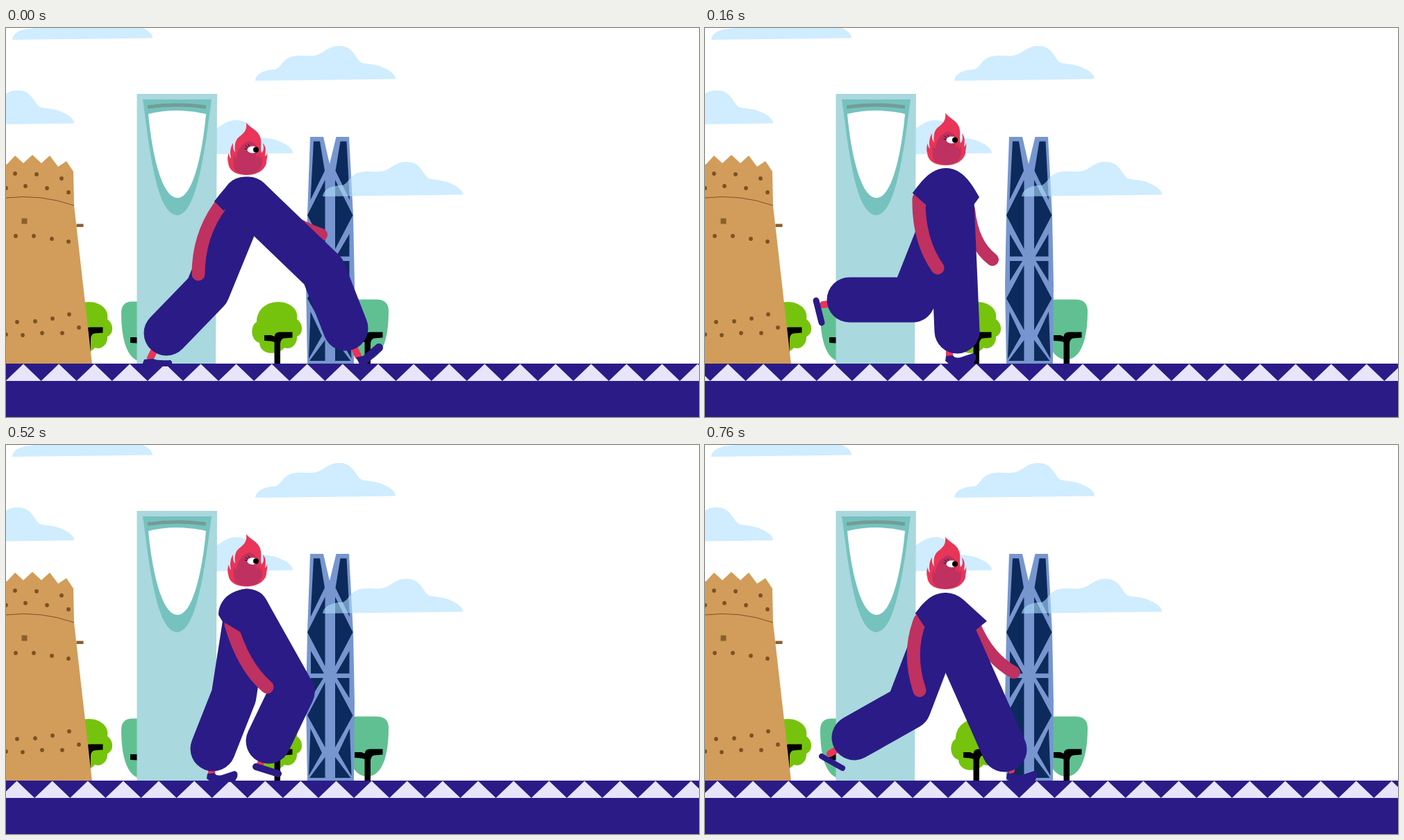
Animation of 998x561 px, one loop 0.88 s. Source, as an HTML page:

```html
<!DOCTYPE html>
<html lang="en">
<head>
<meta charset="utf-8">
<title>City walk</title>
<style>
  html, body { margin: 0; width: 100%; height: 100%; overflow: hidden; background: #fff; }
  svg { display: block; width: 100%; height: 100%; }
  .line { fill: none; stroke-linecap: round; stroke-linejoin: round; }
</style>
</head>
<body>
<svg viewBox="0 0 998 561">
  <defs>
    <path id="cloud" d="M359 76C360 66 372 60 387 60C398 57 397 42 419 40C431 39 441 42 450 38C460 34 466 25 482 26C501 27 504 46 512 50C521 53 533 51 545 58C555 62 561 68 561 73.500Z"/>
    <path id="greenCrown" fill="#76c30e" d="M392 395C409 395 422 406 419 420C428 426 429 441 419 445C420 457 409 465 401 461C393 472 366 473 365 454C351 450 352 428 361 424C361 406 375 395 392 395Z"/>
    <path id="branches" d="M386.500 485V453Q382 451 372 451V443H382L386.500 445Q387 438.500 394 438.500H412.500V446.500L400 447.500Q395 449 395 456V485Z"/>
    <g id="tealTree">
      <path fill="#61c092" d="M505 391.500H533Q551 391.500 551 408C551 450 541 478 520 478C499 478 489 450 489 408Q489 391.500 505 391.500Z"/>
      <use href="#branches" x="130"/>
    </g>
    <path id="panels" fill="#0c2a5b" d="M443 163.500H452L459 206L438.500 248ZM459.500 219V319L434 270ZM439 297L458 329.500H439ZM439 336H457L439 365ZM459.500 342V436L434 390ZM438.500 409L455 444L436 477ZM459.500 450V480H437Z"/>
  </defs>

  <g fill="#d0ecff">
    <use href="#cloud"/>
    <use href="#cloud" x="-350" y="-59"/>
    <use href="#cloud" x="-463" y="64"/>
    <use href="#cloud" x="-148" y="107"/>
  </g>
  <use href="#greenCrown"/>
  <use href="#branches"/>
  <use href="#greenCrown" x="-273"/>
  <use href="#branches" x="-273" y="-7"/>
  <use href="#tealTree"/>
  <use href="#tealTree" x="-323" y="3"/>

  <g id="fort">
    <path fill="#d29c5a" d="M0 197L2 196L13 184L25 195L38 183L51 195L63 184L75 200L87 192L97 207L98 256L124 485H0Z"/>
    <path fill="none" stroke="#7a5226" d="M0 245Q50 239 98 256"/>
    <path fill="#8a5f2e" d="M22.500 274.500h8v8h-8zM101.500 282.500h10v4.500h-10z"/>
    <g id="holes" fill="#7a5226"></g>
  </g>

  <path fill="#a9d8de" d="M188.500 95H304L302 485H188.500Z"/>
  <path fill="#76c2be" d="M197 103H296L289 155C280 215 268 270 246 270C223 268 212 212 204 155Z"/>
  <path fill="#fff" d="M205 124Q246 114 288 124C284 170 271 245 247 245C222 245 209 170 205 124Z"/>
  <path fill="none" stroke="#739c97" stroke-width="5" d="M204 114Q246 108 288 114"/>

  <path fill="#7796cf" d="M438 157H457L466 196L475.500 157H494L500 270L502 370L501 485H434L432 370L434 270Z"/>
  <use href="#panels"/>
  <use href="#panels" transform="translate(933.500) scale(-1 1)"/>
  <use href="#cloud" x="97" y="167" fill="#b1dfff" opacity=".6"/>

  <path fill="#2b1b87" d="M0 484H998V561H0Z"/>
  <path id="teeth" fill="#e8e4f9"/>
  <g id="walker"></g>
  <g id="head">
    <path fill="#e93557" d="M346 136C350 144 365 147 367 161C368 168 366 174 368 180C372 177 371 171 370 166C375 172 374 178 373 185Q376 183 376 179C377 186 375 190 375 195C372 206 360 212 347 212C333 212 321 207 320 194Q318 187 321 180Q321 186 324 188C322 180 323 172 327 166Q326 175 330 179C329 170 329 162 337 156C345 150 347 145 346 136Z"/>
    <path fill="#be3160" d="M350 163C338 167 332 178 332 189L328 183C328 192 325 205 335 209Q347 213 359 209C369 204 370 195 368 185L365 190C366 178 362 166 350 163Z"/>
    <path fill="#e93557" d="M358 182Q362 188 361 181L366 178L362 187Z"/>
    <path class="line" stroke="#000" stroke-width=".8" d="M349 173L345 170M349 175L344 174M351 171L349 168"/>
    <ellipse cx="355" cy="175.500" rx="7.500" ry="5" fill="#fff"/>
    <circle cx="360" cy="175.500" r="4"/>
  </g>
</svg>
<script>
const INK = '#2b1b87', SKIN = '#be3160', RED = '#e93557';
const PERIOD = 51.1;
const byId = id => document.getElementById(id);

const holes = [[13, 210], [44, 211], [80, 217], [28, 228], [59, 231], [90, 237], [0, 231],
  [14, 300], [40, 300], [66, 304], [90, 308], [16, 424], [42, 423], [67, 419], [91, 413],
  [24, 443], [52, 440], [81, 440], [105, 432], [0, 442]];
byId('holes').innerHTML = holes.map(([x, y]) => `<circle cx="${x}" cy="${y}" r="2.900"/>`).join('');
byId('teeth').setAttribute('d', 'M0 509' + `l${PERIOD / 2} -24.500l${PERIOD / 2} 24.500`.repeat(23) + 'Z');

const line = (d, color, width) => `<path class="line" d="${d}" stroke="${color}" stroke-width="${width}"/>`;
const shape = (d, x = 0, y = 0) => `<path d="${d}" fill="${INK}" transform="translate(${x} ${y})"/>`;
const ankle = d => line(d, RED, 10);
const shoe = (d, width) => line(d, INK, width);
const flatShoe = (x, y) => shape('M347 473L357 472Q360 477 368 475L386 469Q392 470 390 478L386 485H352L346 480Z', x, y);

// Leg outlines run hip, knee, lower shin.
const wideLegs = ['M344 247L290 379L231 440', 'M349 247L457 351L489 433'];
const midLegs = ['M343 247L293 378L215 422', 'M346 247L431 439'];
const passLegs = ['M350 263L299 392L208 392', 'M355 250L363 437'];
const swingLegs = ['M347 240L328 362L298 438', 'M347 240L412 356L378 427'];
const swingFeet = ankle('M296 464V474') + flatShoe(-57, 1) + ankle('M369 454L365 463') + shoe('M360 464L392 474', 10);

const passTorso = 'M347 202C325 202 311 222 299 238L317 254L330 300H380L387 255L395 244C384 224 370 202 347 202Z';
const passSleeve = 'M322 212L299 238L317 254L335 240Z';

// Upper bodies: torso, sleeve, near arm, far arm.
const armsBack = {
  torso: 'M347 213C325 213 312 230 303 243L313 262L330 290H370L386 270L406 254L372 223Q360 213 347 213Z',
  sleeve: 'M325 222L303 242L316 262L340 245Z',
  near: 'M310 252Q291 300 309 354', far: 'M388 260Q408 308 445 328'
};
const armsFront = {
  torso: 'M347 213C325 213 306 228 306 250L330 290L390 278L396 276L378 240Q374 213 347 213Z',
  sleeve: 'M313 238V260L338 275L350 250Z',
  near: 'M324 264Q342 325 376 354', far: 'M345 260V300'
};

const poses = [
  { ground: 25, head: 0, legs: wideLegs,
    torso: 'M347 215C325 215 312 235 300 250L313 263L340 280L380 250L372 224Q360 215 347 215Z',
    sleeve: 'M330 222L300 250L313 263L340 250Z',
    near: 'M310 254Q277 298 277 355', far: 'M380 255Q405 280 454 298',
    feet: ankle('M213 466L208 476') + shape('M196 486L199 478L212 477Q217 480 237 479Q242 483 236 488H203Z') +
      ankle('M502 462L507 473') + shape('M504 475L514 473L521 488H511Z') + shoe('M514 481L537 461', 12) },
  { ground: 3.6, head: -8, lift: -5, legs: swingLegs, feet: swingFeet, ...armsBack },
  { ground: 33, head: -14, legs: passLegs, torso: passTorso, sleeve: passSleeve,
    near: 'M308 246Q307 306 335 346', far: 'M380 262Q385 312 414 334',
    feet: ankle('M178 398L170 399') + shoe('M160 393L168 425', 9) + ankle('M352 466V473') + flatShoe(0, 0) },
  { ground: 15, head: -4, legs: midLegs, ...armsFront,
    feet: ankle('M190 444L182 447') + shoe('M175 450Q178 468 193 478', 12) + ankle('M433 470V472') + flatShoe(73, 2) },
  { ground: 38, head: 0, legs: wideLegs, torso: '', sleeve: 'M320 250L326 265L344 257L345 245Z',
    near: 'M339 267Q360 310 407 330', far: 'M314 252Q272 282 258 330',
    feet: ankle('M203 452L196 461') + shoe('M193 465Q203 475 222 479', 11) +
      ankle('M506 460L507 469') + shoe('M504 478Q520 474 533 462', 9) },
  { ground: 15.6, head: -8, lift: -5, legs: swingLegs, feet: swingFeet, ...armsFront },
  { ground: 44, head: -15.5, shift: 1, lift: -1.5, legs: passLegs, torso: passTorso, sleeve: passSleeve,
    near: 'M311 247Q309 308 338 349', far: 'M380 264Q386 314 415 336',
    feet: ankle('M178 397H172') + shoe('M160 393L177 423', 8) + ankle('M352 466V472') + flatShoe(0, 0) },
  { ground: 18, head: -4, legs: midLegs, ...armsBack,
    feet: ankle('M187 441L180 445') + shoe('M168 449L198 466', 8) + ankle('M441 464V469') + flatShoe(88, 1) }
];

const upper = (p, body) => `<g transform="translate(${p.shift || 0} ${p.lift || 0})">${body}</g>`;

function draw(p) {
  const legs = p.legs.map(d => line(d, INK, 65)).join('');
  byId('walker').innerHTML =
    upper(p, line(p.far, SKIN, 18)) + p.feet +
    (p.legs === passLegs ? upper(p, legs) : legs) +
    upper(p, shape(p.torso) + line(p.near, SKIN, 19) + shape(p.sleeve));
  byId('head').setAttribute('transform', `translate(0 ${p.head})`);
  byId('teeth').setAttribute('transform', `translate(${p.ground - PERIOD * 1.5})`);
}

let shown = -1;
function tick() {
  const time = performance.now() % 880;
  const index = Math.floor((time + 80) / 120);
  if (index !== shown) draw(poses[shown = index]);
  requestAnimationFrame(tick);
}
tick();
</script>
</body>
</html>
```
